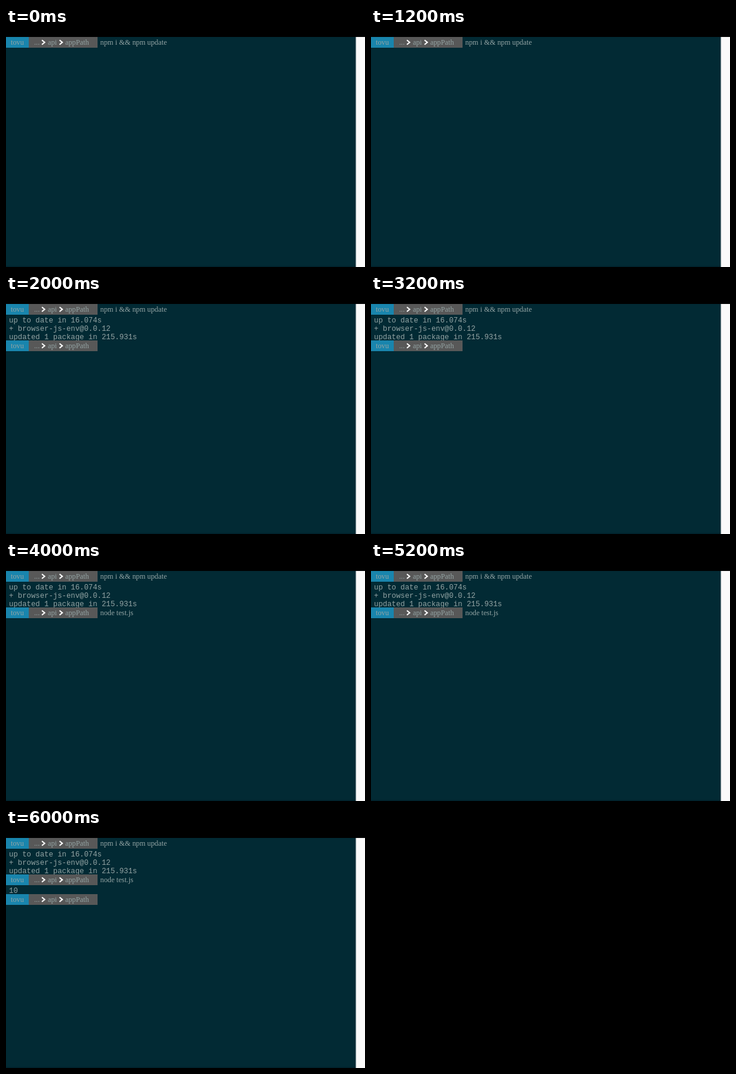
An HTML page for the animation above (8 s loop, 600 px wide and 400 px high).

```html
<!DOCTYPE html>
<html lang="en">
<head>
<meta charset="utf-8">
<title>Terminal</title>
<style>
  html, body { margin: 0; height: 100%; overflow: hidden; background: #000; }
  svg { display: block; width: 600px; height: 400px; }
  text { font: 12.3px "Liberation Serif", Times, serif; fill: #93a3a3; }
  .out { font-family: "Liberation Mono", "Courier New", monospace; }
  .chevron { fill: none; stroke: #fff; stroke-width: 2.1; }
</style>
</head>
<body>
<svg viewBox="0 0 600 400">
  <defs>
    <g id="prompt">
      <rect width="38" height="18" fill="#1985ad"/>
      <rect x="38" width="115" height="18" fill="#585858"/>
      <text x="8" y="13">tovu</text>
      <text x="47" y="13">...</text>
      <path class="chevron" d="M60 5.2l4.6 3.8-4.6 3.8M89.5 5.2l4.6 3.8-4.6 3.8"/>
      <text x="70" y="13">api</text>
      <text x="99" y="13">appPath</text>
    </g>
  </defs>
  <rect y="15" width="585" height="385" fill="#022a34"/>
  <rect y="398" width="585" height="2" fill="#01232d"/>
  <rect x="585" y="15" width="15" height="385" fill="#fafafa"/>
  <rect x="584.5" y="15" width="1" height="385" fill="#c5cccd"/>

  <use href="#prompt" y="15"/>
  <text x="157.5" y="28">npm i &amp;&amp; npm update</text>
  <g class="step">
    <text class="out" x="5" y="45.5">up to date in 16.074s</text>
    <text class="out" x="5" y="59.5">+ browser-js-env@0.0.12</text>
    <text class="out" x="5" y="73.5">updated 1 package in 215.931s</text>
    <use href="#prompt" y="76"/>
  </g>
  <g class="step">
    <text x="157.5" y="89">node test.js</text>
  </g>
  <g class="step">
    <text class="out" x="5" y="106.5">10</text>
    <use href="#prompt" y="109"/>
  </g>
</svg>
<script>
  const STEP_MS = 2000;
  const steps = [...document.querySelectorAll(".step")];

  function draw() {
    const shown = Math.floor(performance.now() / STEP_MS) % (steps.length + 1);
    steps.forEach((step, i) => {
      step.style.visibility = i < shown ? "visible" : "hidden";
    });
    requestAnimationFrame(draw);
  }
  draw();
</script>
</body>
</html>
```
